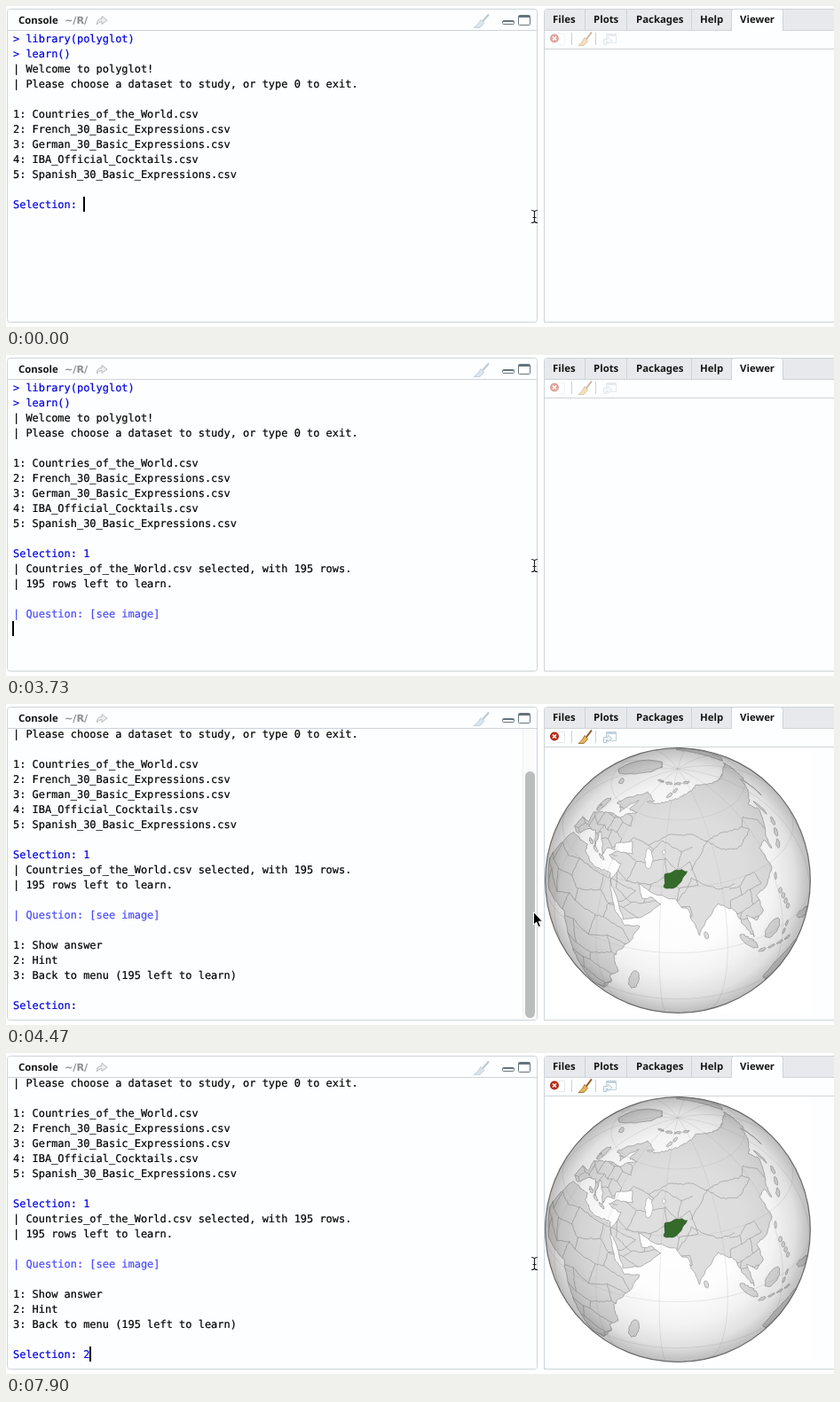
An HTML page for the animation above (8 s loop, 933 by 362 pixels).

```html
<!DOCTYPE html>
<html lang="en">
<head>
<meta charset="utf-8">
<title>Console quiz</title>
<style>
html, body { margin: 0; width: 100%; height: 100%; overflow: hidden; background: #fff; }
svg { display: block; }
text { white-space: pre; text-rendering: geometricPrecision; }
#rows text { font: 11.96px "DejaVu Sans Mono", monospace; stroke-width: .2; }
.tab { font: bold 11.4px "Noto Sans", sans-serif; fill: #161616; }
.path { font: bold 11.2px "DejaVu Sans", sans-serif; fill: #8e8e8e; }
.edge { fill: none; stroke: #cdd4d9; }
</style>
</head>
<body>
<svg width="933" height="362" viewBox="0 0 933 362">
  <defs>
    <clipPath id="body"><rect x="2" y="28" width="596" height="328"/></clipPath>
    <clipPath id="disc"><circle cx="757" cy="199" r="149.5"/></clipPath>
    <clipPath id="inland"><path id="mask"/></clipPath>
    <radialGradient id="shade">
      <stop offset="0" stop-opacity="0"/>
      <stop offset=".5" stop-opacity=".01"/>
      <stop offset=".72" stop-opacity=".05"/>
      <stop offset=".88" stop-opacity=".12"/>
      <stop offset="1" stop-opacity=".27"/>
    </radialGradient>
    <g id="broom">
      <path d="M17 0L10 8" stroke-width="2"/>
      <path d="M8 6L12 10L7 15L0 15Q5 12 8 6Z" stroke-width=".8"/>
    </g>
  </defs>

  <!-- console pane -->
  <rect class="edge" x="1.5" y="3.5" width="597" height="353" rx="3" style="fill:#fdfeff"/>
  <path class="edge" d="M2 27.5H598"/>
  <text class="tab" x="14" y="20">Console</text>
  <text class="path" x="66" y="20">~/R/</text>
  <path d="M102.5 21Q102 14.5 108 14.5V11.500L114 16L108 20.5V17.5Q104 17.5 102.5 21Z" fill="#eee" stroke="#b9b9b9"/>
  <use href="#broom" x="527" y="9.5" stroke="#bdc8d3" fill="#dbe4ec"/>
  <rect x="559.5" y="16.5" width="13" height="4" rx="1" fill="#fff" stroke="#66737c"/>
  <path d="M560 17.5H572" stroke="#66737c"/>
  <rect x="577.5" y="10.5" width="13" height="11" rx="1" fill="#fff" stroke="#66737c"/>
  <path d="M578 12H590" stroke="#66737c" stroke-width="2"/>
  <g clip-path="url(#body)">
    <g id="rows"></g>
    <g id="bar">
      <rect x="582" y="28" width="16" height="328" fill="#fafafa"/>
      <path d="M582.5 28V356" stroke="#e3e3e3"/>
      <rect x="585" y="76" width="11" height="278" rx="5.5" fill="#7c7c7c"/>
    </g>
  </g>

  <!-- viewer pane -->
  <path class="edge" d="M940 3.5H609.5Q606.5 3.5 606.5 6.5V356.5H940" style="fill:#fdfeff"/>
  <path d="M607 27V6.5Q607 4 609.5 4H933V27Z" fill="#e7e9ec"/>
  <path class="edge" d="M607 27.5H817M875 27.5H933M652.5 4V27M699.5 4V27M772.5 4V27M607 48.5H933"/>
  <path class="edge" d="M817.5 28V6.5Q817.5 3.5 820.5 3.5H872.5Q875.5 3.5 875.5 6.5V28" style="fill:#fdfeff"/>
  <g id="tabs"></g>
  <path d="M637.5 30V44M664.5 30V44" stroke="#cfcfcf"/>
  <g id="tools">
    <path d="M620.5 31.5H629.5V43.5H620.5" fill="#fff" stroke="#e6e9ed"/>
    <circle cx="618" cy="36.5" r="5" fill="#b52a18"/>
    <path d="M616 34.5L620 38.5M620 34.5L616 38.5" stroke="#fff" stroke-width="1.6"/>
    <use href="#broom" transform="translate(645 29.5) scale(.88 1)" stroke="#8e5a22" fill="#e9b552"/>
    <path d="M676.5 31.5H687.5V41.5H676.5Z" fill="#fff" stroke="#c3d0db"/>
    <path d="M677 33H687" stroke="#c3d0db" stroke-width="2"/>
    <path d="M673.5 43.5V37.5H678V35L683 39L678 43V40.5H676.5V43.5Z" fill="#eef4f8" stroke="#b9c8d5"/>
  </g>

  <g id="globe">
    <rect x="607" y="49" width="300" height="300" fill="#fff"/>
    <g clip-path="url(#disc)" stroke-linejoin="round">
      <path id="land" fill="#dfdfdf" stroke="#9a9a9a" stroke-width=".7"/>
      <path id="borders" clip-path="url(#inland)" fill="none" stroke="#929292" stroke-width=".6"/>
      <path id="lakes" fill="#fff" stroke="#9a9a9a" stroke-width=".6"/>
      <path id="grid" fill="none" stroke="#aaa" stroke-opacity=".4" stroke-width=".6"/>
      <circle cx="757" cy="199" r="150" fill="url(#shade)"/>
      <path id="answer" fill="#346a2a" stroke="#24501d" stroke-width=".6"/>
    </g>
    <circle cx="757" cy="199" r="149.3" fill="none" stroke="#6b6b6b" stroke-width="1.2"/>
  </g>

  <rect id="caret" width="2" height="17"/>
  <path id="beam" d="M592 230.5Q595 230.5 595.5 232Q596 230.5 599 230.5M595.5 232V243M592 244.5Q595 244.5 595.5 243Q596 244.5 599 244.5M593.5 238.5H597.5" fill="none" stroke="#222" stroke-width="1.2"/>
  <path id="arrow" d="M594.5 234.5V249L597.7 246L600 251.5L602.5 250.5L600.2 245.2H604.5Z" fill="#000" stroke="#fff"/>
</svg>
<script>
const LOOP = 8000, PICK = 2090, ENTER = 3580, ASK = 3730, SCROLL = 3880, IMAGE = 4030, LAST = 7900;
const $ = id => document.getElementById(id);

function addText(parent, x, y, str, attrs) {
  const el = document.createElementNS('http://www.w3.org/2000/svg', 'text');
  Object.entries({ x, y, ...attrs }).forEach(([k, v]) => el.setAttribute(k, v));
  el.textContent = str;
  return parent.appendChild(el);
}

[['Files', 616], ['Plots', 662], ['Packages', 710], ['Help', 782], ['Viewer', 827]]
  .forEach(([name, x]) => addText($('tabs'), x, 19, name, { class: 'tab' }));

// Console text in blocks: first row, time of appearance, colour, lines
const BLUE = '#0000dc', SOFT = '#4a4aff', BLACK = '#000';
const rows = [];
function block(row, from, fill, lines) {
  lines.split('\n').forEach((str, i) => rows.push({
    from, el: addText($('rows'), 8, 41 + 17 * (row + i), str, { fill, stroke: fill })
  }));
}
block(0, 0, BLUE, '> library(polyglot)\n> learn()');
block(2, 0, BLACK, '| Welcome to polyglot!\n| Please choose a dataset to study, or type 0 to exit.');
block(5, 0, BLACK, `1: Countries_of_the_World.csv
2: French_30_Basic_Expressions.csv
3: German_30_Basic_Expressions.csv
4: IBA_Official_Cocktails.csv
5: Spanish_30_Basic_Expressions.csv`);
block(11, 0, BLUE, 'Selection: ');
block(11, PICK, BLUE, ' '.repeat(11) + '1');
block(12, ASK, BLACK, '| Countries_of_the_World.csv selected, with 195 rows.\n| 195 rows left to learn.');
block(15, ASK, SOFT, '| Question: [see image]');
block(17, SCROLL, BLACK, '1: Show answer\n2: Hint\n3: Back to menu (195 left to learn)');
block(21, SCROLL, BLUE, 'Selection: ');
block(21, LAST, BLUE, ' '.repeat(11) + '2');

// Caret: start, column, row; and the times at which it turns off and on
const places = [[0, 11, 11], [PICK, 12, 11], [ENTER, 0, 12], [ASK, 0, 16], [SCROLL, 11, 21], [LAST, 12, 21]];
const blinks = [750, 1050, 1650, PICK, 2690, 2990, 4470, 4920, 5520, 5820, 6410, 6860, 7460, LAST];

// Orthographic globe; hidden points are pushed to the rim
const RAD = Math.PI / 180, LON = 68 * RAD, LAT = 33 * RAD;
function project([lon, lat]) {
  const l = lon * RAD - LON, p = lat * RAD;
  const depth = Math.sin(LAT) * Math.sin(p) + Math.cos(LAT) * Math.cos(p) * Math.cos(l);
  let x = Math.cos(p) * Math.sin(l);
  let y = Math.cos(LAT) * Math.sin(p) - Math.sin(LAT) * Math.cos(p) * Math.cos(l);
  if (depth < 0) { const r = Math.hypot(x, y); x /= r; y /= r; }
  return { x: 757 + 150 * x, y: 199 - 150 * y, seen: depth > 0 };
}

let seed = 7;
const rnd = () => (seed = seed * 16807 % 2147483647) / 2147483647 - .5;

// Path through lon/lat points, each edge broken into small uneven steps
function rough(pts, amp) {
  const out = [pts[0]];
  for (let i = 1; i < pts.length; i++) {
    const [a, b] = pts[i - 1], [c, d] = pts[i];
    const n = Math.ceil(Math.hypot(c - a, d - b) / 1.5);
    for (let k = 1; k < n; k++) out.push([a + (c - a) * k / n + rnd() * amp, b + (d - b) * k / n + rnd() * amp]);
    out.push(pts[i]);
  }
  return 'M' + out.map(project).map(p => p.x.toFixed(1) + ' ' + p.y.toFixed(1)).join('L');
}
const parse = str => str.trim().split(/\s+/).map(p => p.split(',').map(Number));
const area = (pts, amp = .9) => rough([...pts, pts[0]], amp) + 'Z';

// Row of n islands from one point to another, with half-width w in degrees
function chain(x1, y1, x2, y2, n, w) {
  const len = Math.hypot(x2 - x1, y2 - y1);
  let d = '';
  for (let i = 0; i < n; i++) {
    const ring = [];
    for (let k = 0; k < 8; k++) {
      const a = k * Math.PI / 4;
      const f = (i + .5 + Math.cos(a) * (n > 1 ? .4 : .5)) / n;
      const side = Math.sin(a) * w / len;
      const lat = y1 + (y2 - y1) * f + (x2 - x1) * side;
      ring.push([x1 + (x2 - x1) * f - (y2 - y1) * side / Math.cos(lat * RAD), lat]);
    }
    d += area(ring);
  }
  return d;
}

// Uneven brickwork of borders inside a lon/lat box
function cells(west, south, east, north, step) {
  const cols = Math.round((east - west) / step), rowsUp = Math.round((north - south) / step);
  const nodes = Array.from({ length: rowsUp + 1 }, (_, j) => Array.from({ length: cols + 1 }, (_, i) =>
    [west + (i + rnd() * .7) * step, south + (j + rnd() * .7) * step]));
  let d = '';
  for (let j = 0; j <= rowsUp; j++) {
    for (let i = 0; i <= cols; i++) {
      if (i < cols) d += rough([nodes[j][i], nodes[j][i + 1]], .6);
      if (j < rowsUp && (i + j) % 2) d += rough([nodes[j][i], nodes[j + 1][i]], .6);
    }
  }
  return d;
}

// Coasts by their main capes and gulfs
const asia = `33,28 39,21 43,13 52,16 60,22.5 56,25 51,24 48,30 57,26.5 67,25 70,21 73,20 77.5,8 80,13 87,21.5
  94,17 98,9 103,1.5 100,13 105,9 109,12 107,20 114,22 121,28 119,38 125,39.5 127,34.5 128,40 140,50 136,55
  155,59 163,62 156,51 163,60 190,66 170,70 140,72 105,77 72,72 44,67`;
const europe = `33,66.5 40,68 25,71 10,64 6,59 11,59 16,56.5 18,61 23,65.5 22,60 30,60 22,57 20,54.5 9,54
  -4,48.4 -1,44 -9,43 -9,37 -2,37 3,42 9,44 16,38 13,45 20,41 23,36.5 24,40.5 29,41 28,44 38,47 41,42 31,41 27,38 36,36.5 34.5,31`;
const africa = `-17,15 -8,4.5 9,4 13,-10 18,-34 26,-34 35,-24 35,-20 40.5,-15 39,-6 48,5 51,11.5 44,10.500 39,15.5
  33,28 32,31 20,31 11,34 10,37 -6,35.5`;
const answer = `61,35.5 63.5,36 66.5,37.4 70.2,37.7 71.5,37 73,36.8 71,34.6 69.3,32 66.3,29.8 62.5,29.4 61,29.9 61.5,31.5`;

const islands = [
  [45.5, -25, 49.5, -12, 1, 2.2],   // off Africa
  [80, 9.6, 81, 6, 1, .9],
  [96, 5, 105, -5, 1, 1.6],         // Sunda chain
  [105, -7, 127, -9, 4, .7],
  [109, -1, 118, 4, 1, 3.5],
  [120, -5, 124, 1, 2, .8],
  [121, 18, 125, 6, 4, 1.2],
  [131, 32, 144, 44, 3, 1.1],       // Pacific arc
  [142, 46, 143, 54, 1, .6],
  [120.5, 22, 122, 25, 1, .6],
  [131, -1, 150, -9, 1, 2.2],
  [114, -27, 150, -24, 1, 9],
  [-3, 50, -4, 58, 1, 1.7],         // Atlantic and Arctic
  [-24, 65, -14, 65, 1, 1.2],
  [-45, 61, -40, 83, 1, 6],
  [52, 71, 68, 77, 2, .8],
  [15, 79, 100, 80, 4, .6],
  [-165, 65, -110, 67, 1, 4],
  [8, 40, 26, 35, 3, .6]
];
const regions = [[-18, -34, 45, 32, 9], [-9, 38, 33, 58, 5], [36, 16, 76, 48, 8], [92, 10, 110, 25, 6]];
const longBorders = [
  '68,24 73,30 75,34 80,31 88,27.5 97,28',
  '75,37 80,42 87.5,49 98,51 116,49.5 120,47 105,42 95,44 87.5,49 78,53 61,53 49,47',
  '116,49.5 122,53 131,48 131,43'
];

// Graticule every 30 degrees, broken where it passes behind the globe
function gridLine(point) {
  let d = '', down = false;
  for (let a = -180; a <= 180; a += 3) {
    const p = project(point(a));
    if (p.seen) d += (down ? 'L' : 'M') + p.x.toFixed(1) + ' ' + p.y.toFixed(1);
    down = p.seen;
  }
  return d;
}
let grid = '';
for (let lat = -60; lat <= 60; lat += 30) grid += gridLine(a => [a, lat]);
for (let lon = 0; lon < 360; lon += 30) grid += gridLine(a => [lon, a / 2]);

const draw = (id, d) => $(id).setAttribute('d', d);
const land = area(parse(asia + ' ' + europe)) + area(parse(africa)) + islands.map(i => chain(...i)).join('');
draw('land', land);
draw('mask', land);
draw('lakes', chain(50, 46, 52, 37, 1, 1.8) + chain(59, 46, 60, 44, 1, .8));
draw('borders', regions.map(r => cells(...r)).join('') + longBorders.map(b => rough(parse(b), .8)).join(''));
draw('answer', area(parse(answer), .5));
draw('grid', grid);

const show = (el, on) => { el.style.visibility = on ? 'visible' : 'hidden'; };

function render(t) {
  const scrolled = t >= SCROLL, shift = scrolled ? -54 : 0;
  rows.forEach(r => show(r.el, t >= r.from));
  $('rows').setAttribute('transform', `translate(0 ${shift})`);

  const [, col, row] = places.filter(p => p[0] <= t).pop();
  $('caret').setAttribute('x', Math.floor(7.8 + 7.2 * col));
  $('caret').setAttribute('y', 28 + 17 * row + shift);
  show($('caret'), blinks.filter(b => b <= t).length % 2 === 0);

  $('bar').style.opacity = !scrolled || t >= 4620 ? 0 : t >= 4470 ? .5 : 1;
  $('tools').style.opacity = scrolled ? 1 : .42;
  show($('globe'), t >= IMAGE);
  const arrow = scrolled && t < LAST;
  show($('arrow'), arrow);
  show($('beam'), !arrow);
}

const start = performance.now();
function tick() {
  render((performance.now() - start) % LOOP);
  requestAnimationFrame(tick);
}
tick();
</script>
</body>
</html>
```
